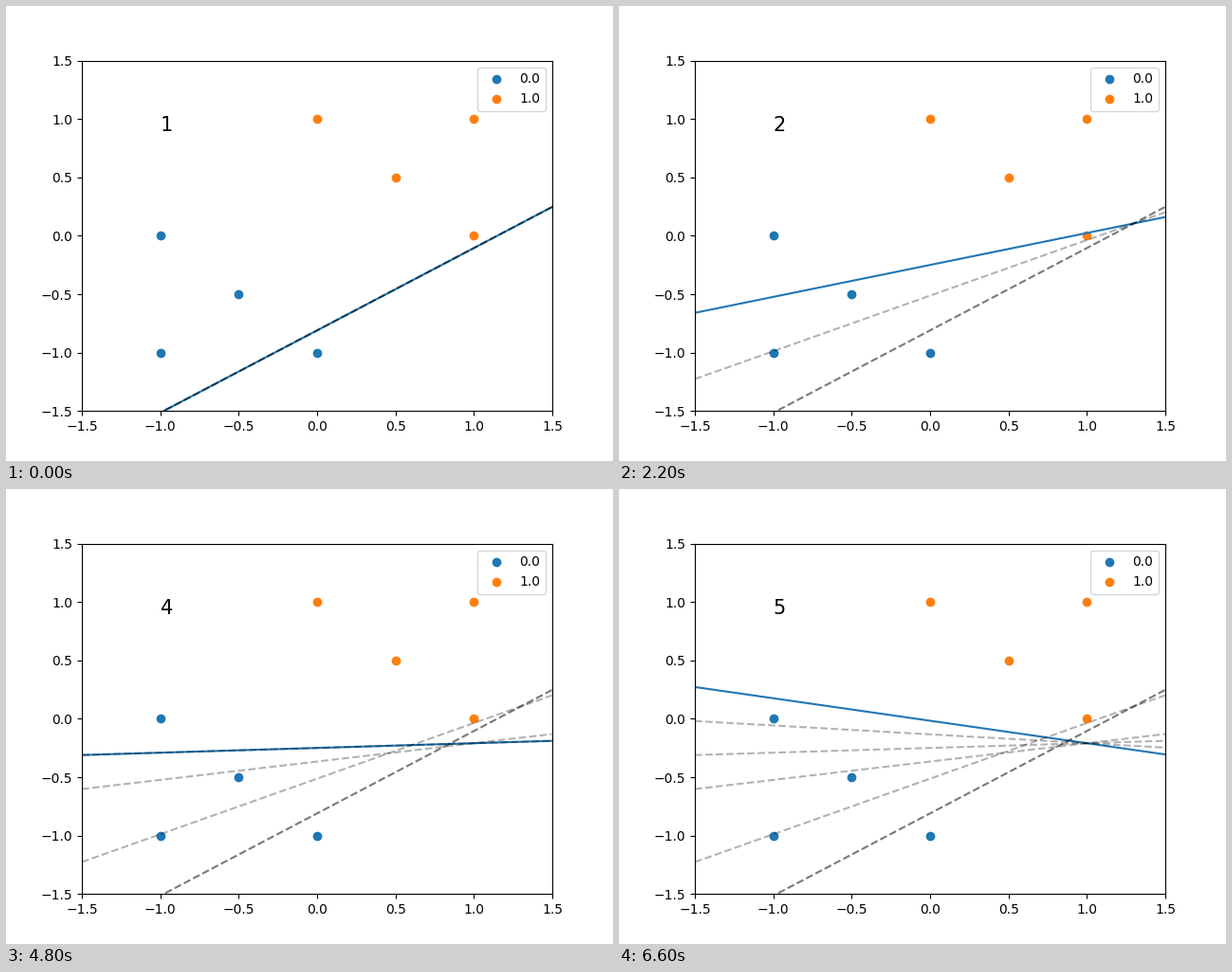
Write a matplotlib script that moves like this. It is 640 px wide and 480 px high and loops after 8000 ms.

```python
import numpy as np
import matplotlib.pyplot as plt
from matplotlib.animation import FuncAnimation

RATE = 0.1
EPOCHS = 5
STEP_MS = 200
LIMIT = 1.5

# Two clusters that mirror each other through the origin.
base = np.array([(1, 1), (1, 0), (0, 1), (0.5, 0.5)])
points = np.vstack([-base, base])
labels = np.repeat([0.0, 1.0], len(base))
n = len(points)
xs = np.array([-LIMIT, LIMIT])


def train(w):
    """Weights after each single-sample perceptron step."""
    history = []
    for i in range(EPOCHS * n):
        x = np.array([1.0, *points[i % n]])
        w = w + RATE * (labels[i % n] - float(w @ x > 0)) * x
        history.append(w)
    return history


def boundary(w):
    return -(w[0] + w[1] * xs) / w[2]


weights = train(np.array([0.7144, -0.6348, 0.6584]))

fig, ax = plt.subplots(figsize=(6.4, 4.8), dpi=100)
for value in np.unique(labels):
    ax.scatter(*points[labels == value].T, label=str(value))
ax.set_xlim(-LIMIT, LIMIT)
ax.set_ylim(-LIMIT, LIMIT)
ax.legend(loc="upper right")

line, = ax.plot(xs, boundary(weights[0]), color="C0")
counter = ax.text(-1, 0.9, "1", fontsize=15)

# The starting boundary is laid down twice, so it reads darker.
trails = []
for epoch in [0, *range(EPOCHS)]:
    trail, = ax.plot(xs, boundary(weights[epoch * n]), "k--", alpha=0.3)
    trails.append((epoch, trail))


def update(step):
    now = step // n
    line.set_ydata(boundary(weights[step]))
    counter.set_text(str(now + 1))
    for epoch, trail in trails:
        trail.set_visible(epoch <= now)
    return [line, counter, *(trail for _, trail in trails)]


anim = FuncAnimation(fig, update, frames=EPOCHS * n, interval=STEP_MS,
                     repeat=True, repeat_delay=0)
plt.show()
```
